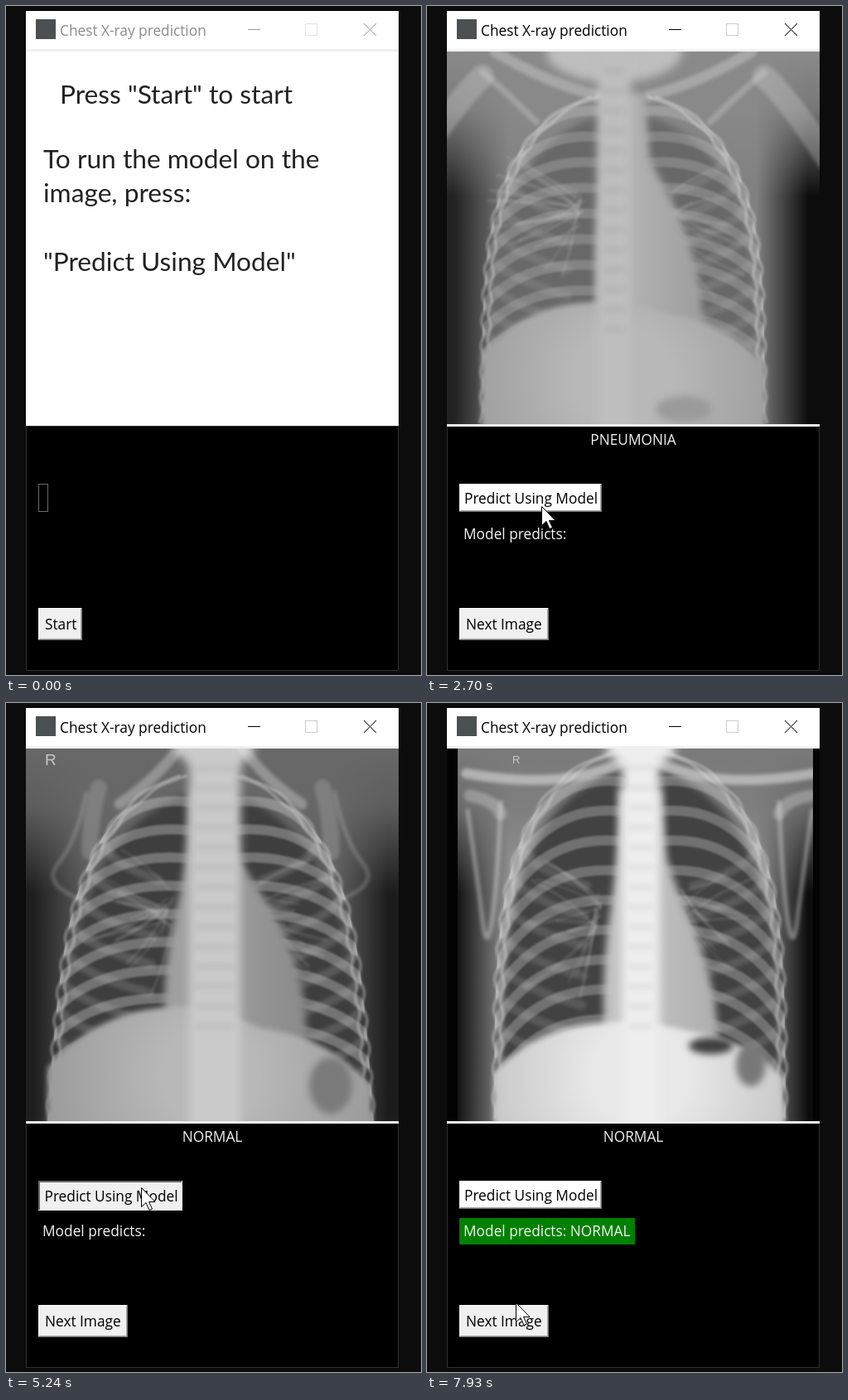
Animation, 501 px wide and 808 px high, one loop 8000 ms. Source, as an HTML page with a canvas:

```html
<!DOCTYPE html>
<html lang="en">
<head>
<meta charset="utf-8">
<title>Chest X-ray prediction</title>
<style>
html, body { margin: 0; width: 100%; height: 100%; overflow: hidden; background: #0c0c0c; }
canvas { display: block; width: 100vw; height: 100vh; }
</style>
</head>
<body>
<canvas id="stage" width="501" height="808"></canvas>
<script>
const ctx = document.getElementById('stage').getContext('2d');
const LOOP = 8000, STEP = 76;
const UI = '17.3px "Open Sans", "Noto Sans", sans-serif';
const NOTE = '31.7px Lato, "Open Sans", sans-serif';
const grey = (v, a = 1) => `rgba(${v},${v},${v},${a})`;

// ---------- X-ray pictures ----------

const TOP = 55, BOTTOM = 505, LEFT = 24, SIZE = 450;
const SIDES = [-1, 1];

// shownAt, press, label, release: times in ms; the rest shapes the picture.
// bones hold [distance from the midline, y] and are drawn on both sides.
const scans = [
  {
    truth: 'PNEUMONIA', labelWidth: 242,
    shownAt: 1520, press: 3095, label: 3550, release: 3550,
    edges: [34, 12], flesh: 128, shoulder: 138, neck: 82,
    cx: 237, top: 104, width: 169, slope: 2,
    lung: 104, heart: 180, heartLeft: 30, heartRight: 95,
    dome: 357, domeDrop: 62, tilt: 14, belly: 184,
    spineX: 226, spineWidth: 40, spine: 190,
    ribStart: 128, ribGap: 31, ribDrop: 48, ribAlpha: .2,
    bones: [
      { width: 28, alpha: .25, at: [[170, 85], [200, 112], [250, 190]] },
      { width: 13, alpha: .3, at: [[32, 108], [95, 92], [155, 55]] },
      { width: 8, alpha: .25, at: [[170, 80], [140, 105], [105, 140]] }
    ],
    gas: [[310, 487, 34, 16, 155]]
  },
  {
    truth: 'NORMAL', labelWidth: 212,
    shownAt: 4550, press: 5160, label: 5310, release: 5310,
    edges: [30, 28], flesh: 96, shoulder: 104, neck: 48,
    cx: 247, top: 82, width: 165, slope: 32,
    lung: 62, heart: 160, heartLeft: 54, heartRight: 115,
    dome: 366, domeDrop: 75, tilt: 25, belly: 184,
    spineX: 252, spineWidth: 62, spine: 202,
    ribStart: 120, ribGap: 34, ribDrop: 44, ribAlpha: .3,
    bones: [
      { width: 13, alpha: .32, at: [[32, 45], [60, 88], [110, 122]] },
      { width: 20, alpha: .18, at: [[135, 102], [146, 140], [146, 180]] },
      { width: 4, alpha: .25, at: [[150, 108], [162, 168], [206, 220], [150, 240]] }
    ],
    gas: [[392, 462, 26, 34, 122]],
    mark: { x: 47, y: 75, size: 19 }
  },
  {
    truth: 'NORMAL', labelWidth: 212,
    shownAt: 6085, press: 7320, label: 7470, release: 7550,
    edges: [10, 12], flesh: 150, shoulder: 122, neck: 42, bars: true,
    cx: 257, top: 55, width: 174, slope: 2,
    lung: 66, heart: 196, heartLeft: 42, heartRight: 94,
    dome: 385, domeDrop: 62, tilt: 9, belly: 232,
    spineX: 258, spineWidth: 46, spine: 238,
    ribStart: 95, ribGap: 36, ribDrop: 76, ribAlpha: .27,
    bones: [
      { width: 12, alpha: .5, at: [[22, 72], [95, 106], [210, 85]] },
      { width: 15, alpha: .3, at: [[205, 112], [174, 118], [168, 134]] },
      { width: 5, alpha: .4, at: [[208, 130], [195, 220], [185, 305], [172, 220], [168, 120]] }
    ],
    gas: [[343, 414, 27, 10, 62], [391, 437, 18, 26, 120]],
    mark: { x: 103, y: 73, size: 13 }
  }
];

function random(seed) {
  return () => (seed = (seed * 16807) % 2147483647) / 2147483647;
}

const sample = (from, to, step, fn) =>
  Array.from({ length: Math.floor((to - from) / step) + 1 }, (_, i) => fn(from + i * step));

// Half width of the rib cage at height y
function half(s, y, top = s.top) {
  const v = Math.min(1, Math.max(0, (y - top) / (BOTTOM - s.top)));
  return s.width * Math.sqrt(1 - (1 - v) ** 4) + s.slope * v;
}

function cagePath(g, s, inset = 0) {
  const top = s.top + inset * 3;
  g.beginPath();
  for (const side of SIDES) {
    const pts = sample(top, BOTTOM + 10, 5, y => [s.cx + side * Math.max(0, half(s, y, top) - inset), y]);
    if (side > 0) pts.reverse();
    pts.forEach(p => g.lineTo(...p));
  }
  g.closePath();
}

function soft(g, blur, paint) {
  g.save();
  g.filter = `blur(${blur}px)`;
  paint();
  g.restore();
}

// Smooth open curve through a few points
function stroke(g, pts, width, alpha, blur = 1.2) {
  soft(g, blur, () => {
    g.strokeStyle = grey(238, alpha);
    g.lineWidth = width;
    g.beginPath();
    g.moveTo(...pts[0]);
    for (let i = 1; i < pts.length - 1; i++) {
      const [a, b] = [pts[i], pts[i + 1]];
      const end = i === pts.length - 2 ? b : [(a[0] + b[0]) / 2, (a[1] + b[1]) / 2];
      g.quadraticCurveTo(...a, ...end);
    }
    g.stroke();
  });
}

function ellipse(g, x, y, rx, ry, tone, blur) {
  soft(g, blur, () => {
    g.fillStyle = grey(tone);
    g.beginPath();
    g.ellipse(x, y, rx, ry, 0, 0, 7);
    g.fill();
  });
}

function drawBody(g, s) {
  const across = g.createLinearGradient(LEFT, 0, LEFT + SIZE, 0);
  [s.edges[0], s.flesh, s.flesh, s.edges[1]].forEach((tone, i) =>
    across.addColorStop([.02, .17, .83, .97][i], grey(tone)));
  g.fillStyle = across;
  g.fillRect(LEFT, TOP, SIZE, SIZE);
  const down = g.createLinearGradient(0, TOP, 0, 230);
  down.addColorStop(0, grey(s.shoulder));
  down.addColorStop(.4, grey(s.shoulder, .85));
  down.addColorStop(1, grey(s.shoulder, 0));
  g.fillStyle = down;
  g.fillRect(LEFT, TOP, SIZE, 180);
  ellipse(g, s.spineX, TOP, s.neck, s.neck * .45, s.spine, 6);
}

function drawRibs(g, s) {
  g.save();
  cagePath(g, s);
  g.clip();
  for (const side of SIDES) {
    const at = (part, y) => [s.cx + side * half(s, y) * part, y];
    for (let y = s.ribStart; y < BOTTOM - 40; y += s.ribGap) {
      const low = y + s.ribDrop;
      stroke(g, [[s.cx + side * 22, y], [s.cx + side * half(s, low) * .7, y - 10], at(1, low)], 12, s.ribAlpha);
      stroke(g, [at(1, low), at(.87, low + 28), at(.4, low + 50)], 11, s.ribAlpha * .5, 2);
    }
  }
  g.restore();
  for (const side of SIDES) for (const inset of [0, 8]) {
    const wave = y => 2.5 * Math.sin(y / s.ribGap * 2 * Math.PI + inset);
    stroke(g, sample(s.top + 6, BOTTOM, 8, y => [s.cx + side * (half(s, y) - inset + wave(y)), y]), 4, .3);
  }
}

// Fine vessels spreading from the lung roots
function drawVessels(g, s, rnd) {
  for (const side of SIDES) for (let i = 0; i < 16; i++) {
    const angle = -.7 + rnd() * 2.1, len = 40 + rnd() * 75;
    const x = s.cx + side * (45 + rnd() * 12), y = 225 + rnd() * 45;
    const dx = side * Math.cos(angle) * len, dy = Math.sin(angle) * len;
    stroke(g, [[x, y], [x + dx * .4, y + dy * .6], [x + dx, y + dy]], 1.5 + rnd() * 3, .12, 1.5);
  }
}

function drawHeart(g, s) {
  const { cx, dome, heartLeft: l, heartRight: r } = s;
  soft(g, 5, () => {
    const tone = g.createLinearGradient(cx, 0, cx + r, 0);
    tone.addColorStop(0, grey(s.heart));
    tone.addColorStop(1, grey(s.heart - 22));
    g.fillStyle = tone;
    g.beginPath();
    g.moveTo(cx - 26, TOP + 50);
    g.bezierCurveTo(cx - 24, 250, cx - l - 8, 260, cx - l, dome + 30);
    g.lineTo(cx + r, dome + 50);
    g.bezierCurveTo(cx + r + 6, dome - 65, cx + r * .55, dome - 130, cx + 32, 185);
    g.lineTo(cx + 26, TOP + 50);
    g.fill();
  });
}

function drawBelly(g, s) {
  const tone = g.createRadialGradient(s.cx, 450, 60, s.cx, 450, 220);
  tone.addColorStop(0, grey(s.belly));
  tone.addColorStop(1, grey(Math.round(s.belly * .82)));
  const span = half(s, BOTTOM);
  soft(g, 3, () => {
    g.fillStyle = tone;
    g.beginPath();
    sample(-span, span, 6, d => [s.cx + d, s.dome + s.domeDrop * Math.abs(d / span) ** 3 + (d > 0 ? s.tilt * Math.min(1, d / 60) : 0)])
      .forEach(p => g.lineTo(...p));
    g.lineTo(s.cx + span, BOTTOM + 30);
    g.lineTo(s.cx - span, BOTTOM + 30);
    g.fill();
  });
}

function drawSpine(g, s) {
  const x = s.spineX - s.spineWidth / 2;
  soft(g, 6, () => {
    g.fillStyle = grey(s.spine);
    g.fillRect(x, TOP - 20, s.spineWidth, SIZE + 40);
  });
  soft(g, 3, () => {
    g.fillStyle = grey(0, .05);
    for (let y = 75; y < 400; y += 24) g.fillRect(x + 8, y, s.spineWidth - 16, 7);
  });
}

function xray(s, i) {
  const c = document.createElement('canvas');
  c.width = c.height = SIZE;
  const g = c.getContext('2d');
  g.lineCap = 'round';
  g.translate(-LEFT, -TOP);
  drawBody(g, s);
  soft(g, 5, () => {
    g.fillStyle = grey(s.lung);
    cagePath(g, s, 8);
    g.fill();
  });
  drawRibs(g, s);
  drawVessels(g, s, random(71 + i));
  drawHeart(g, s);
  drawBelly(g, s);
  drawSpine(g, s);
  for (const { width, alpha, at } of s.bones)
    for (const side of SIDES) stroke(g, at.map(([d, y]) => [s.cx + side * d, y]), width, alpha, 2);
  s.gas.forEach(spot => ellipse(g, ...spot, 4));
  if (s.bars) {
    g.fillStyle = '#030303';
    g.fillRect(LEFT, TOP, 13, SIZE);
    g.fillRect(466, TOP, 8, SIZE);
  }
  if (s.mark) {
    g.font = `${s.mark.size}px "Liberation Sans", sans-serif`;
    g.fillStyle = '#c8c8c8';
    g.fillText('R', s.mark.x, s.mark.y);
  }
  return c;
}

scans.forEach((s, i) => { s.picture = xray(s, i); });

// ---------- Pointer ----------

// start, end, target x, target y
const ENTRY = 450;
const moves = [
  [ENTRY, 1140, 62, 744],
  [2000, 2300, 141, 618],
  [2700, 2700, 138, 604],
  [2775, 2850, 134, 588],
  [3780, 3780, 138, 591],
  [3940, 4020, 145, 655],
  [4100, 4250, 117, 750],
  [4630, 5010, 165, 567],
  [5160, 5160, 163, 585],
  [5620, 5930, 112, 744],
  [6240, 6390, 125, 675],
  [6470, 6690, 180, 596],
  [7780, 7930, 107, 724]
];
const ease = u => u * u * (3 - 2 * u);

function pointer(t) {
  let x = 446, y = 806;
  for (const [start, end, tx, ty] of moves) {
    if (t < start) break;
    const steps = Math.round((end - start) / STEP) + 1;
    const u = ease(Math.min(1, (Math.floor((t - start) / STEP + .05) + 1) / steps)), v = 1 - u;
    const bow = .7 * u * v * Math.abs(tx - x);
    x = v * x + u * tx;
    y = v * y + u * ty - bow;
  }
  return [Math.round(x), Math.round(y)];
}

// ---------- Window ----------

const during = (t, from, to) => t >= from && t < to;

function rect(x, y, w, h, color) {
  ctx.fillStyle = color;
  ctx.fillRect(x, y, w, h);
}

function text(str, x, y, color, font = UI, align = 'left') {
  ctx.font = font;
  ctx.textAlign = align;
  ctx.fillStyle = color;
  ctx.fillText(str, x, y);
}

function line(color, x0, y0, x1, y1) {
  ctx.strokeStyle = color;
  ctx.lineWidth = 1;
  ctx.beginPath();
  ctx.moveTo(x0, y0);
  ctx.lineTo(x1, y1);
  ctx.stroke();
}

function titleBar(active) {
  const ink = active ? '#000' : '#999';
  rect(24, 6, 450, 47, '#fff');
  rect(24, 52, 450, 3, '#f0f0f0');
  rect(36, 16, 24, 24, '#4b5052');
  text('Chest X-ray prediction', 65, 36, active ? '#000' : '#8c8c8c');
  line(ink, 292, 28.5, 307, 28.5);
  line(ink, 432, 21, 447, 36);
  line(ink, 447, 21, 432, 36);
  ctx.strokeStyle = active ? '#ccc' : '#e2e2e2';
  ctx.strokeRect(361.5, 21.5, 14, 14);
}

function button(label, x, y, w, h, pad, face, down) {
  const shift = down ? 1.5 : 0;
  if (down) {
    rect(x, y, w, h, '#e8e8e8');
    rect(x, y, w - 1, h - 1, '#696969');
    rect(x + 2, y + 2, w - 3, h - 3, '#f0f0f0');
  } else {
    rect(x, y, w, h, '#777');
    rect(x, y, w - 1, h - 1, '#fff');
    rect(x + 1, y + 1, w - 2, h - 2, '#a6a6a6');
    rect(x + 1, y + 1, w - 3, h - 3, face);
  }
  text(label, x + pad + shift, y + h / 2 + 6.5 + shift / 2, '#000');
}

function intro() {
  const ink = '#222';
  rect(24, 55, 450, 452, '#fff');
  text('Press "Start" to start', 65, 118, ink, NOTE);
  text('To run the model on the', 45, 196, ink, NOTE);
  text('image, press:', 45, 237, ink, NOTE);
  text('"Predict Using Model"', 45, 320, ink, NOTE);
  ctx.strokeStyle = '#6a6a6a';
  ctx.lineWidth = 1;
  ctx.strokeRect(39.5, 577.5, 11, 33);
}

function results(t, s) {
  ctx.drawImage(s.picture, LEFT, TOP);
  rect(24, 505, 450, 3, '#eef2ee');
  text(s.truth, 249, 530, '#f0f0f0', UI, 'center');

  const down = during(t, s.press, s.release), grow = down ? 2 : 0;
  button('Predict Using Model', 39, 577, 172 + grow, 34 + grow, 6, '#fff', down);

  const done = t >= s.label;
  if (done) rect(39, 622, s.labelWidth, 32, '#008000');
  text('Model predicts:' + (done ? ' ' + s.truth : ''), 44, 644, '#f4f4f4');
}

function arrow(x, y) {
  const pts = [[0, 0], [0, 23], [5.5, 18], [9.5, 27], [13, 25.5], [9, 17], [16.5, 17]];
  ctx.beginPath();
  pts.forEach(([px, py]) => ctx.lineTo(x + px + .5, y + py + .5));
  ctx.closePath();
  ctx.fillStyle = '#fff';
  ctx.fill();
  ctx.strokeStyle = '#000';
  ctx.lineWidth = 1;
  ctx.stroke();
}

function draw(t) {
  const scan = scans.filter(s => t >= s.shownAt).pop();
  rect(0, 0, 501, 808, '#0c0c0c');
  rect(24, 507, 450, 296, '#303030');
  rect(25, 508, 448, 294, '#000');
  titleBar(t >= 1390);
  if (scan) results(t, scan); else intro();
  const down = during(t, 1450, 1520) || during(t, 4400, 4550) || during(t, 6005, 6085);
  button(scan ? 'Next Image' : 'Start', 39, 727, scan ? 108 : 53, 39, 8, '#f0f0f0', down);
  if (t >= ENTRY) arrow(...pointer(t));
}

const begin = performance.now();
function tick() {
  draw((performance.now() - begin) % LOOP);
  requestAnimationFrame(tick);
}
tick();
</script>
</body>
</html>
```
